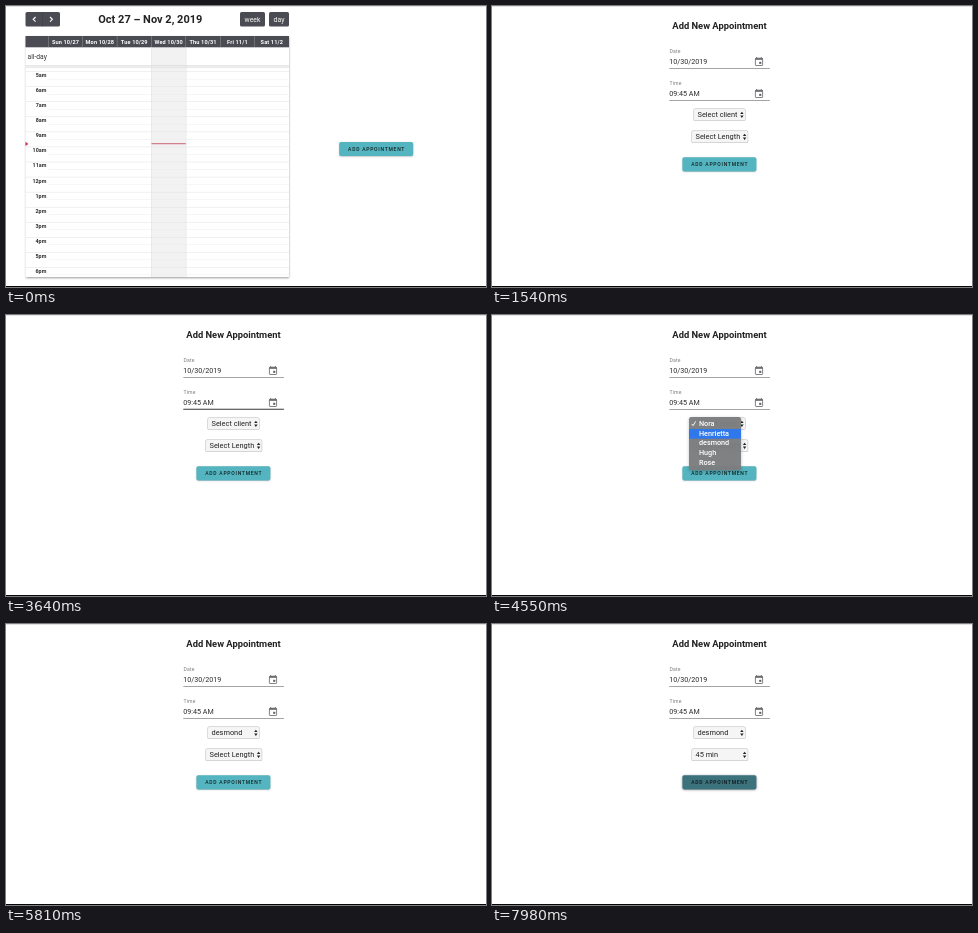
Write an HTML page with a canvas that moves like this. It is 480 px wide and 281 px high and loops after 8 s.

```html
<!DOCTYPE html>
<html lang="en">
<head>
<meta charset="utf-8">
<title>Appointment form</title>
<style>
  html, body { margin: 0; width: 100%; height: 100%; overflow: hidden; background: #fff; }
  canvas { display: block; width: 480px; height: 281px; }
</style>
</head>
<body>
<canvas id="stage"></canvas>
<script>
const W = 480, H = 281, LOOP = 8000, TICK = 70;
const DARK = '#4b4b53', TEAL = [84, 180, 191], DEEP = [59, 114, 124];
const canvas = document.getElementById('stage');
const ctx = canvas.getContext('2d');
const ratio = window.devicePixelRatio || 1;
canvas.width = W * ratio;
canvas.height = H * ratio;

const clamp = v => Math.max(0, Math.min(1, v));
const ramp = (t, from, to) => clamp((t - from) / (to - from));
const within = (t, from, to) => t >= from && t < to;
const blend = (a, b, k) => `rgb(${a.map((v, i) => Math.round(v + (b[i] - v) * k))})`;

function rect(x, y, w, h, color) {
  ctx.fillStyle = color;
  ctx.fillRect(x, y, w, h);
}

function roundRect(x, y, w, h, r, color) {
  ctx.beginPath();
  ctx.roundRect(x, y, w, h, r);
  ctx.fillStyle = color;
  ctx.fill();
}

function text(str, x, y, size, { weight = 400, color = '#222', align = 'left', gap = 0 } = {}) {
  ctx.font = `${weight} ${size}px Roboto, "Open Sans", sans-serif`;
  ctx.letterSpacing = gap + 'px';
  ctx.textAlign = align;
  ctx.fillStyle = color;
  ctx.fillText(str, x, y);
}

function poly(points, color) {
  ctx.beginPath();
  points.forEach(([x, y]) => ctx.lineTo(x, y));
  ctx.closePath();
  ctx.fillStyle = color;
  ctx.fill();
}

function stroke(points, color, width) {
  ctx.beginPath();
  points.forEach(([x, y]) => ctx.lineTo(x, y));
  ctx.strokeStyle = color;
  ctx.lineWidth = width;
  ctx.stroke();
}

function withShadow(color, blur, dy, draw) {
  ctx.save();
  ctx.shadowColor = color;
  ctx.shadowBlur = blur * ratio;
  ctx.shadowOffsetY = dy * ratio;
  draw();
  ctx.restore();
}

function addButton(x, y, hover) {
  withShadow(`rgba(0,0,0,${0.25 + 0.15 * hover})`, 1.5 + hover, 0.6, () =>
    roundRect(x, y, 74, 14.2, 1.8, blend(TEAL, DEEP, hover)));
  text('ADD APPOINTMENT', x + 8.9, y + 9.2, 5, { weight: 500, color: 'rgba(0,0,0,0.8)', gap: 0.74 });
}

// Calendar page

function drawToolbar() {
  roundRect(19.5, 6, 34.5, 14.5, 1.6, DARK);
  rect(36.5, 6, 0.5, 14.5, '#3f3f46');
  stroke([[29.6, 11], [27.2, 13.3], [29.6, 15.6]], '#fff', 1.1);
  stroke([[44, 11], [46.4, 13.3], [44, 15.6]], '#fff', 1.1);
  text('Oct 27 – Nov 2, 2019', 144.3, 17, 11, { weight: 700, align: 'center' });
  [['week', 234, 25], ['day', 263, 20]].forEach(([label, x, w]) => {
    roundRect(x, 6, w, 14.5, 1.6, DARK);
    text(label, x + w / 2, 15.6, 6.8, { color: '#fff', align: 'center', gap: 0.1 });
  });
}

function drawCalendar() {
  const left = 19.5, right = 283, axis = 42.3, top = 30, bottom = 271;
  const col = (right - axis) / 7, hour = 15.06, first = 65.4;
  const wed = axis + 3 * col;

  withShadow('rgba(0,0,0,0.4)', 2, 0.6, () => rect(left, top, right - left, bottom - top, '#fff'));
  rect(wed, 41, col, bottom - 41, '#f2f2f3');
  rect(left, top, right - left, 11.3, DARK);

  const days = ['Sun 10/27', 'Mon 10/28', 'Tue 10/29', 'Wed 10/30', 'Thu 10/31', 'Fri 11/1', 'Sat 11/2'];
  days.forEach((day, i) => {
    const x = axis + i * col;
    rect(x - 0.2, top, 0.4, 11.3, '#a5a5aa');
    text(day, x + col / 2, 37.6, 5.6, { weight: 700, color: '#fff', align: 'center', gap: 0.12 });
  });

  text('all-day', 21.6, 53, 6.7, { color: '#333' });
  rect(left, 59.5, right - left, 0.6, '#cfcfcf');
  rect(left, 60.1, right - left, 1, '#eeeeee');
  rect(left, 61.1, right - left, 0.5, '#d4d4d4');

  for (let i = 0; i < 14; i++) {
    const y = first + i * hour, h = i + 5;
    rect(left, y, right - left, 0.5, '#e0e0e0');
    rect(axis, y + hour / 2, right - axis, 0.4, '#e9e9e9');
    text((h > 12 ? h - 12 : h) + (h < 12 ? 'am' : 'pm'), 40.3, y + 5.7, 5.4,
      { weight: 700, color: '#2d2d2d', align: 'right' });
  }
  rect(wed, 41, 0.5, bottom - 41, '#dcdcdc');
  rect(wed + col, 41, 0.5, bottom - 41, '#dcdcdc');

  poly([[left, 135.7], [22.4, 137.9], [left, 140.1]], '#c0344c');
  rect(wed, 137.3, col, 0.9, '#c45064');
}

// Form page

function calendarIcon(cx, cy) {
  const c = '#636367';
  ctx.save();
  ctx.translate(cx, cy);
  ctx.beginPath();
  ctx.roundRect(-3.6, -3.2, 7.2, 7.3, 0.6);
  ctx.strokeStyle = c;
  ctx.lineWidth = 0.8;
  ctx.stroke();
  rect(-3.6, -3.2, 7.2, 1.6, c);
  rect(-2.7, -4.4, 0.8, 1.3, c);
  rect(1.9, -4.4, 0.8, 1.3, c);
  rect(0.2, 0.4, 2.1, 2.1, c);
  ctx.restore();
}

function field(label, value, y, hover = 0, glow = 0) {
  text(label, 177.6, y + 2.5, 5.1, { color: '#7c7c7c', gap: 0.1 });
  text(value, 177.3, y + 14.1, 7.15, { color: '#2a2a2a' });
  if (glow) {
    ctx.beginPath();
    ctx.arc(267.6, y + 11.7, 10.5, 0, Math.PI * 2);
    ctx.fillStyle = `rgba(0,0,0,${0.08 * glow})`;
    ctx.fill();
  }
  calendarIcon(267, y + 11.4);
  const thick = 1 + 0.4 * hover;
  rect(177.3, y + 19 - thick, 100.6, thick, blend([164, 164, 164], [95, 95, 95], hover));
}

function select(label, x, y, w) {
  roundRect(x, y, w, 12.6, 1.6, '#b8b8b8');
  roundRect(x + 0.5, y + 0.5, w - 1, 11.6, 1.2, '#f5f5f5');
  text(label, x + 4, y + 8.6, 7.4, { color: '#222' });
  const ax = x + w - 3.6, ay = y + 6.3;
  poly([[ax - 1.7, ay - 0.7], [ax, ay - 3.1], [ax + 1.7, ay - 0.7]], '#222');
  poly([[ax - 1.7, ay + 0.7], [ax, ay + 3.1], [ax + 1.7, ay + 0.7]], '#222');
}

function popup(items, x, y, w, active, alpha) {
  const row = 9.75, pad = 2.2;
  ctx.save();
  ctx.globalAlpha = alpha;
  withShadow('rgba(0,0,0,0.25)', 3.5, 1, () =>
    roundRect(x, y, w, items.length * row + pad * 2, 2.2, 'rgba(124,126,128,0.96)'));
  if (active >= 0) rect(x, y + pad + active * row, w, row, '#2f78ec');
  items.forEach((item, i) =>
    text(item, x + 9.9, y + pad + i * row + 6.7, 7.25, { weight: 500, color: '#fff' }));
  const cy = y + pad + row / 2 - 0.3;
  stroke([[x + 2.8, cy + 0.2], [x + 4.1, cy + 1.9], [x + 6.6, cy - 2.4]], '#fff', 0.9);
  ctx.restore();
}

const clients = ['Nora', 'Henrietta', 'desmond', 'Hugh', 'Rose'];
const lengths = ['30 min', '45 min', '60 min'];

function clientRow(t) {
  if (t < 4550) return 0;
  if (t < 4900) return 1;
  return within(t, 5460, 5530) ? -1 : 2;
}

function lengthRow(t) {
  if (t < 6860) return 0;
  return within(t, 7560, 7700) ? -1 : 1;
}

function drawForm(t) {
  text('Add New Appointment', 227.5, 22.9, 9.35, { weight: 700, align: 'center' });

  const onIcon = within(t, 2870, 3640) ? ramp(t, 2800, 3010) : 0;
  let hover = onIcon;
  if (within(t, 2240, 2310)) hover = 0.5;
  if (within(t, 3640, 3710)) hover = 0.85;
  field('Date', '10/30/2019', 44);
  field('Time', '09:45 AM', 76, hover, onIcon);

  select(t < 5600 ? 'Select client' : clients[2], 201.5, 102.5, 52);
  select(t < 7770 ? 'Select Length' : lengths[1], 199.5, 124.5, 56.7);
  addButton(190.4, 151.2, ramp(t, 7840, 7980));

  if (within(t, 3990, 5810)) popup(clients, 197, 102, 52, clientRow(t), 1 - ramp(t, 5530, 5810));
  if (within(t, 6510, 7910)) popup(lengths, 194.2, 124.4, 57.4, lengthRow(t), 1 - ramp(t, 7700, 7910));
}

function draw(ms) {
  const t = Math.floor((ms % LOOP) / TICK) * TICK;
  ctx.setTransform(ratio, 0, 0, ratio, 0, 0);
  rect(0, 0, W, H, '#fff');
  rect(0, 0, W, 1, '#e2e2e2');
  if (t < 1540) {
    drawToolbar();
    drawCalendar();
    addButton(333.2, 135.9, t >= 1190 ? 1 : 0);
  } else {
    drawForm(t);
  }
  rect(0, 280, W, 1, '#050505');
}

const start = performance.now();
function loop() {
  draw(performance.now() - start);
  requestAnimationFrame(loop);
}
loop();
</script>
</body>
</html>
```
